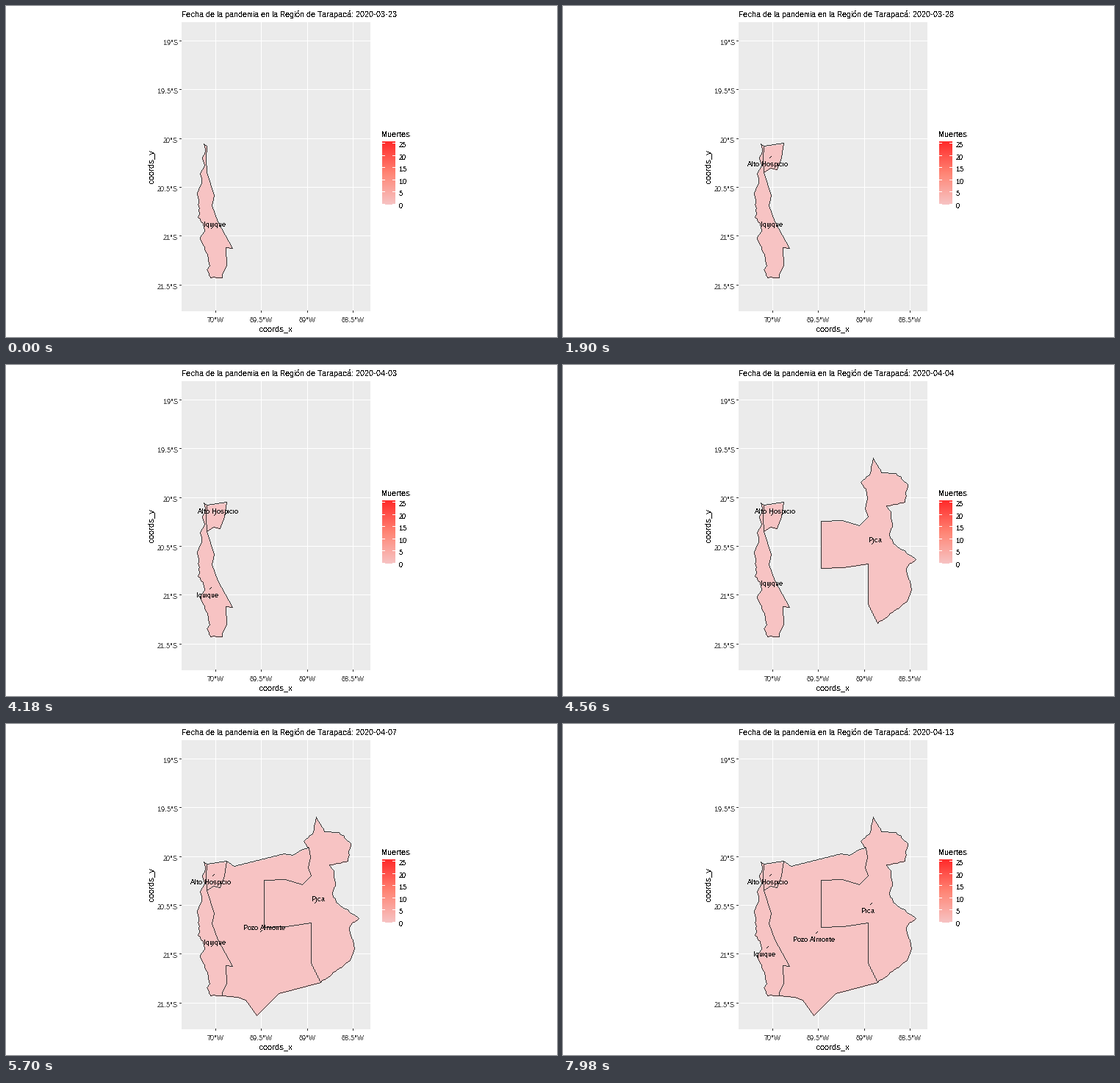
Write a matplotlib script that moves like this. It is 750 px wide and 450 px high and loops after 8000 ms.

```python
import matplotlib.pyplot as plt
import numpy as np
from matplotlib.animation import FuncAnimation
from matplotlib.colors import LinearSegmentedColormap
from matplotlib.patches import Polygon, Rectangle

W, H, DPI = 750, 450, 100
TICK_MS, DAY_MS, LOOP_MS = 20, 380, 8000
DAYS = 22
PINK, DARK = "#F7C3C3", "#333333"

# crisp, unkerned bitmap lettering
plt.rcParams.update({
    "font.family": "Liberation Sans",
    "text.hinting": "default",
    "text.hinting_factor": 1,
    "text.kerning_factor": 6,
    "text.antialiased": False,
})

fig = plt.figure(figsize=(W / DPI, H / DPI), dpi=DPI, facecolor="white")
ax = fig.add_axes([0, 0, 1, 1])
ax.axis("off")
rng = np.random.default_rng(7)


def write(x, y, s, size=9, color="black", ha="left", **kw):
    return ax.text(x, y, s, fontsize=size * 72 / DPI, color=color, ha=ha,
                   va="baseline", **kw)


def trace(points):
    """Whole pixels along a line, one per step of its longer side."""
    parts = []
    for a, b in zip(points, points[1:]):
        a, b = np.array(a, float), np.array(b, float)
        n = int(np.ceil(np.abs(b - a).max()))
        parts.append(np.round(np.linspace(a, b, n + 1)))
    return np.concatenate(parts).T


def draw(lines, color, z):
    """Hard-edged lines one pixel wide."""
    x, y = np.hstack([trace(p) for p in lines])
    return ax.plot(x, y, ",", color=color, zorder=z)[0]


def rough(points, amp=1.0, step=3.5):
    """Shake a coarse line into a ragged shore or ridge."""
    out = []
    for a, b in zip(points, points[1:]):
        a, b = np.array(a, float), np.array(b, float)
        n = max(1, int(np.hypot(*(b - a)) / step))
        out.append(a)
        out += [a + (b - a) * k / n + rng.uniform(-amp, amp, 2)
                for k in range(1, n)]
    return [tuple(np.round(p)) for p in out + [points[-1]]]


# ---- panel, grid and axes ----
ax.add_patch(Rectangle((239, 22), 257, 393, fc="#EBEBEB", lw=0, zorder=0))
grid, ticks = [], []
for k in range(6):
    y = round(48 + 66.35 * k)
    grid.append([(239, y), (495, y)])
    ticks.append([(236, y), (238, y)])
    write(234, y + 5, f"{19 + k / 2:g}°S", color="#4D4D4D", ha="right")
for k in range(4):
    x = round(285 + 62.4 * k)
    grid.append([(x, 22), (x, 414)])
    ticks.append([(x, 415), (x, 417)])
    write(x + 0.5, 430, f"{70 - k / 2:g}°W", color="#4D4D4D", ha="center")
draw(grid, "white", 1)
draw(ticks, DARK, 1)
write(367.5, 442, "coords_x", 11, ha="center")
write(201, 218, "coords_y", 11, ha="center", rotation=90,
      rotation_mode="anchor")

# ---- colour bar ----
ramp = LinearSegmentedColormap.from_list("deaths",
                                         [PINK, "#FF8474", "#FF2A2A"])
ax.imshow(np.linspace(1, 0, 86)[:, None], cmap=ramp, aspect="auto",
          extent=(512, 530, 270, 184), interpolation="nearest", zorder=1)
write(511, 178, "Muertes", 11)
marks = []
for k in range(6):
    y = round(270 - 16.6 * k)
    marks += [[(512, y), (515, y)], [(526, y), (529, y)]]
    write(535, y + 5, str(5 * k))
draw(marks, "white", 2)

ax.set_xlim(0, W)
ax.set_ylim(H, 0)

# ---- borders, shared between neighbouring communes ----
coast = rough([(269, 188), (271, 199), (267, 209), (270, 218), (264, 228),
               (266, 242), (261, 252), (263, 283), (261, 288), (268, 296),
               (270, 306), (264, 317), (270, 329), (277, 354), (273, 359),
               (278, 370), (294, 370)])
shore = [(273, 191), (272, 208), (273, 227)]
inland = [(273, 227), (283, 258), (280, 272), (288, 294), (308, 330),
          (299, 329), (300, 354), (294, 365), (294, 370)]
alto_east = [(300, 187), (297, 207), (291, 223), (282, 221), (273, 227)]
pozo_north = [(300, 187), (310, 194), (378, 177), (390, 179), (403, 171),
              (412, 169)]
pozo_south = [(294, 370), (315, 372), (326, 376), (341, 397), (371, 367),
              (428, 352)]
pica_west = [(412, 169), (414, 182), (411, 196), (415, 207), (403, 219),
             (380, 212), (351, 213), (351, 277), (381, 276), (415, 271),
             (415, 326), (428, 352)]
pica_east = rough([(412, 169), (405, 160), (418, 148), (422, 127),
                   (433, 147), (453, 148), (469, 163), (465, 187),
                   (440, 192), (446, 200), (448, 220), (444, 231),
                   (449, 243), (480, 265), (467, 277), (474, 306),
                   (468, 322), (428, 352)], 0.8)


class Commune:
    """An area whose label hops above (H) or below (L) its centre each day.

    The days given are the last ones; before them the area is hidden.
    """

    def __init__(self, name, outline, centre, days):
        self.days = days.rjust(DAYS)
        self.cx, self.cy = centre
        self.parts = (
            ax.add_patch(Polygon(np.array(outline) + 0.5, fc=PINK, lw=0,
                                 zorder=3)),
            draw([outline + outline[:1]], DARK, 4),
            ax.plot([], [], ",", color="black", zorder=5)[0],
            write(0, 0, name, ha="center", zorder=6),
        )

    def show(self, day):
        state = self.days[day]
        for part in self.parts:
            part.set_visible(state != " ")
        link, label = self.parts[2:]
        side = 1 if state == "H" else -1
        label.set_position((self.cx + 5 * side, self.cy + 3 - 8 * side))
        x, y = int(self.cx), self.cy - 2
        link.set_data(*trace([(x, y), (x + 2 * side, y - 2 * side)]))


communes = [
    Commune("Pozo Almonte",
            alto_east + inland + pozo_south + pica_west[::-1]
            + pozo_north[::-1],
            (346.5, 285), "HHHLHLHLL"),
    Commune("Pica", pica_east + pica_west[::-1], (420.5, 246), "HHLHLLHLLL"),
    Commune("Iquique", coast + inland[::-1] + shore[::-1],
            (279, 305), "HHHLHHHLHLLLHHHHHHLHLL"),
    Commune("Alto Hospicio", shore + alto_east[::-1],
            (283.5, 207), "HLLLLLLHLHHHLLHLHLLL"),
]
title = write(239, 15, "", 11)
first_day = np.datetime64("2020-03-23")


def update(i):
    day = i * TICK_MS // DAY_MS
    title.set_text("Fecha de la pandemia en la Región de Tarapacá: "
                   f"{first_day + day}")
    for commune in communes:
        commune.show(day)
    return [title]


anim = FuncAnimation(fig, update, frames=LOOP_MS // TICK_MS,
                     interval=TICK_MS, repeat=True, repeat_delay=0,
                     blit=False)
plt.show()
```
